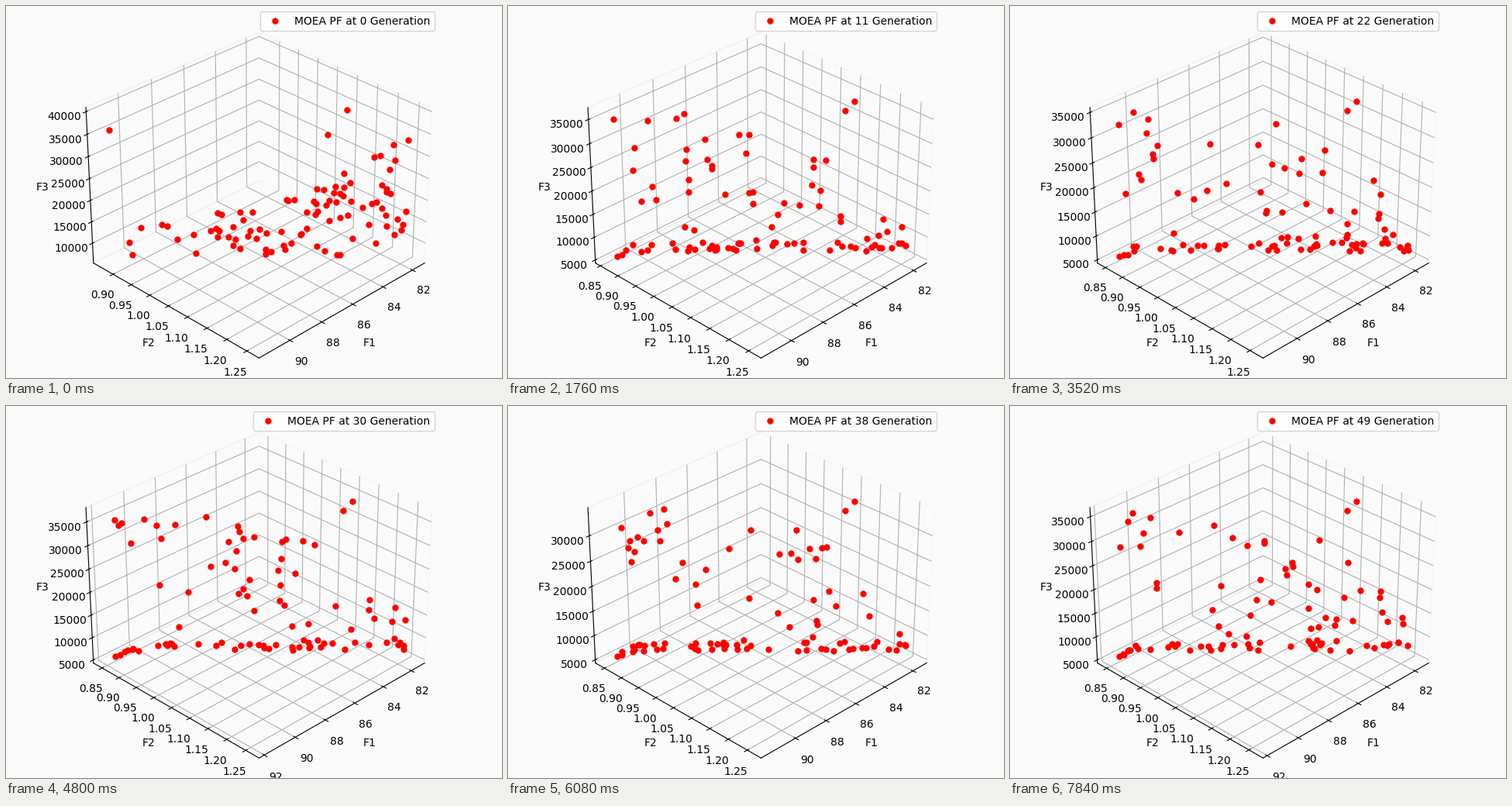
Write a matplotlib script that moves like this. It is 640 by 480 pixels and loops after 8000 ms.

```python
import matplotlib.pyplot as plt
import numpy as np
from matplotlib.animation import FuncAnimation

GENERATIONS = 50
INTERVAL = 160
SIZE = 92
RENEWAL = 0.4
BACKGROUND = "#fafafa"

# The axes are rescaled whenever the extremes of the front move
RESCALES = (0, 3, 15, 21, 26, 34, 44)
F1_MAX = (91.88, 91.86, 92.10, 92.16, 92.33, 92.20, 92.26)
F3_MAX = (40920, 37450, 38080, 35960, 38000, 35480, 36850)
STEPS = (2, 0.05, 5000)

# Key points as (position along the trade-off, height)
OUTLIERS = [(0.064, 0.86), (0.755, 0.985), (0.70, 0.83)]
ELITE = [(0.066, 0.043), (0.08, 0.055), (0.935, 0.117),
         (0.769, 1.04), (0.742, 0.98)]


def first_population(rng):
    u = 0.07 + 0.87 * rng.random(SIZE) ** 0.55
    c = 0.05 + (0.25 + 0.7 * u ** 3) * rng.random(SIZE)
    pop = np.column_stack([u, c])
    pop[-len(OUTLIERS):] = OUTLIERS
    return pop


def front(rng):
    """A dense low rim, with the rest scattered below a falling ceiling."""
    u = rng.uniform(0.07, 0.94, SIZE)
    rim = 0.04 + 0.07 * np.minimum(u / 0.15, 1) + rng.uniform(-0.03, 0.03, SIZE)
    lift = 0.88 * (1 - u ** 4) * rng.random(SIZE) ** (2 * u)
    c = rim + np.where(rng.random(SIZE) < 0.42, 0, lift)
    return np.column_stack([u, c])


def evolve():
    rng = np.random.default_rng(7)
    history = [first_population(rng)]
    for g in range(1, GENERATIONS):
        fresh = rng.random((SIZE, 1)) < RENEWAL
        pop = np.where(fresh, front(rng), history[-1])
        if g >= 8:
            pop[:len(ELITE)] = ELITE
        history.append(pop)
    return history


def limits(g):
    k = np.searchsorted(RESCALES, g, side="right") - 1
    settled = 1 - np.exp(-k / 2)
    return ((81.15 - 0.15 * settled, F1_MAX[k]),
            (0.845 - 0.024 * settled, 1.280 + 0.0012 * k),
            (4310 if k else 5270, F3_MAX[k]))


def inner_ticks(lo, hi, step):
    pad = 0.02 * (hi - lo)
    ticks = step * np.arange(np.floor(lo / step), np.ceil(hi / step) + 1)
    return ticks[(ticks >= lo + pad) & (ticks <= hi - pad)]


def scale(lim, t):
    return lim[0] + t * (lim[1] - lim[0])


history = evolve()

fig = plt.figure(figsize=(6.4, 4.8), dpi=100, facecolor=BACKGROUND)
ax = fig.add_axes([0, 0, 1, 1], projection="3d", facecolor=BACKGROUND)
ax.view_init(elev=30, azim=45)
ax.set(xlabel="F1", ylabel="F2", zlabel="F3")
axes = (ax.xaxis, ax.yaxis, ax.zaxis)
for axis in axes:
    axis.pane.set_fill(False)

points, = ax.plot([], [], [], "o", color="red", markersize=5, label="MOEA PF")
title = ax.legend(loc="upper right").get_texts()[0]


def draw(g):
    xlim, ylim, zlim = limits(g)
    ax.set(xlim=xlim, ylim=ylim, zlim=zlim)
    for axis, lim, step in zip(axes, (xlim, ylim, zlim), STEPS):
        axis.set_ticks(inner_ticks(*lim, step))

    # F1 falls as F2 rises
    u, c = history[g].T
    points.set_data_3d(scale(xlim, 1 - u), scale(ylim, u), scale(zlim, c))
    title.set_text(f"MOEA PF at {g} Generation")
    return points, title


anim = FuncAnimation(fig, draw, frames=GENERATIONS, interval=INTERVAL,
                     repeat=True, repeat_delay=0, blit=False)
plt.show()
```
